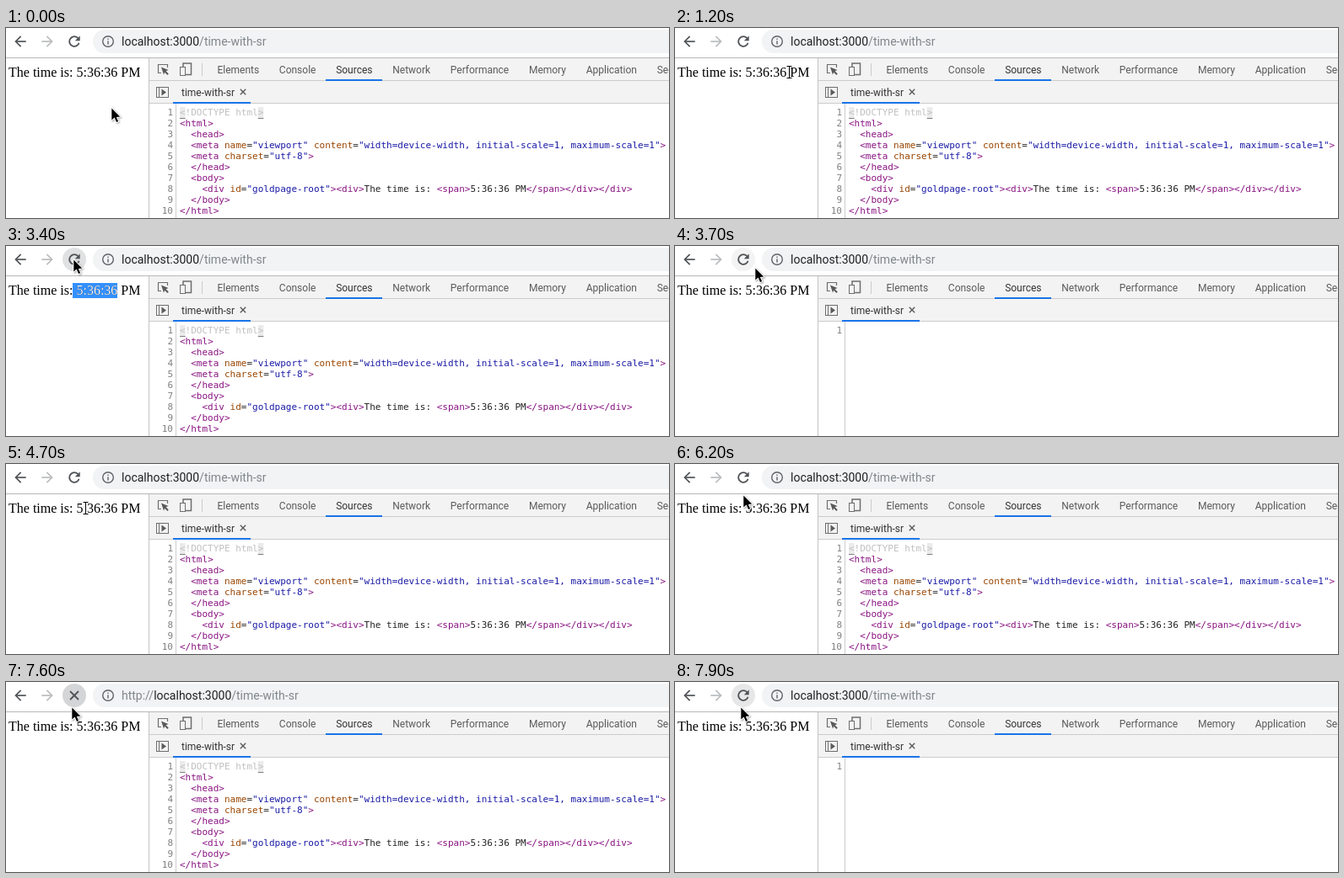
Write an HTML page with a canvas that moves like this. It is 786 px wide and 226 px high and loops after 8 s.

```html
<!DOCTYPE html>
<html>
<head>
<meta charset="utf-8">
<title>Reload demo</title>
<style>
html, body { margin: 0; width: 100%; height: 100%; overflow: hidden; background: #fff; }
canvas, svg { position: absolute; left: 0; top: 0; width: 786px; height: 226px; }
text { white-space: pre; }
.page { font: 16px "Liberation Serif", serif; }
.url { font: 14px Roboto, sans-serif; fill: #202124; }
.tab { font: 12px Roboto, sans-serif; fill: #5a5a5a; }
.on { fill: #333; }
.code { font: 11px "DejaVu Sans Mono", monospace; fill: #222; }
</style>
</head>
<body>
<canvas id="back" width="786" height="226"></canvas>
<svg id="words" viewBox="0 0 786 226">
  <clipPath id="clip"><rect id="sel" y="44" height="18" width="0"/></clipPath>
</svg>
<canvas id="front" width="786" height="226"></canvas>
<script>
const $ = id => document.getElementById(id);
const bg = $('back').getContext('2d');
const fg = $('front').getContext('2d');
const svg = $('words');
const LOOP = 8000;
const INK = '#505357';
const TOOL = '#6e6e6e';
const PAGE_TEXT = 'The time is: 5:36:36 PM';

function el(tag, parent, attrs, text) {
  const e = document.createElementNS('http://www.w3.org/2000/svg', tag);
  for (const k in attrs) e.setAttribute(k, attrs[k]);
  if (text) e.textContent = text;
  parent.appendChild(e);
  return e;
}
function label(cls, x, y, text, parent = svg, fill = '') {
  const e = el('text', parent, { class: cls, x, y }, text);
  e.style.fill = fill;
  return e;
}

// ---- text ----
const url = label('url', 137, 21);
const scheme = el('tspan', url, { fill: '#80868b' });
el('tspan', url, {}, 'localhost:3000');
el('tspan', url, { fill: '#80868b' }, '/time-with-sr');

label('page', 3, 58, PAGE_TEXT);
const picked = label('page', 3, 58, PAGE_TEXT, svg, '#fff');
picked.setAttribute('clip-path', 'url(#clip)');

let tabX = 250.4;
for (const name of 'Elements Console Sources Network Performance Memory Application Security'.split(' ')) {
  const tab = label(name === 'Sources' ? 'tab on' : 'tab', tabX, 54, name);
  tabX += tab.getComputedTextLength() + 23.7;
}
label('tab on', 208, 81, 'time-with-sr');

const lines = [
  '<!DOCTYPE html>',
  '<html>',
  '  <head>',
  '  <meta name="viewport" content="width=device-width, initial-scale=1, maximum-scale=1">',
  '  <meta charset="utf-8">',
  '  </head>',
  '  <body>',
  '    <div id="goldpage-root"><div>The time is: <span>5:36:36 PM</span></div></div>',
  '  </body>',
  '</html>'
];
const CH = 6.622;
const code = el('g', svg, {});
const token = /(<\/?\w+|>)|(\s\w+(?==))|("[^"]*")|=|[^<>]+/g;
lines.forEach((line, i) => {
  const y = 104 + 13 * i;
  const num = label('code', 198, y, String(i + 1), i ? code : svg, '#808080');
  num.setAttribute('text-anchor', 'end');
  const body = line.trimStart();
  const row = label('code', 206 + CH * (line.length - body.length), y, '', code);
  if (!i) {
    row.textContent = body;
    row.style.fill = '#c0c0c0';
    return;
  }
  for (const [text, tag, attr, value] of body.matchAll(token))
    el('tspan', row, { fill: tag ? '#881280' : attr ? '#994500' : value ? '#1a1aa6' : '#222' }, text);
});

// ---- shapes ----
function box(x, y, w, h, color) {
  bg.fillStyle = color;
  bg.fillRect(x, y, w, h);
}
function trace(c, pts, close) {
  c.beginPath();
  for (let i = 0; i < pts.length; i += 2) c.lineTo(pts[i], pts[i + 1]);
  if (close) c.closePath();
}
function line(color, width, ...pts) {
  bg.strokeStyle = color;
  bg.lineWidth = width;
  trace(bg, pts);
  bg.stroke();
}
function fill(color, ...pts) {
  bg.fillStyle = color;
  trace(bg, pts, true);
  bg.fill();
}
function frame(x, y, w, h) {
  bg.strokeStyle = TOOL;
  bg.lineWidth = 1;
  bg.strokeRect(x + .5, y + .5, w, h);
}
function arc(x, y, r, from, to, color, width) {
  bg.strokeStyle = color;
  bg.lineWidth = width;
  bg.beginPath();
  bg.arc(x, y, r, from, to);
  bg.stroke();
}
function cross(x, y, r, color, width) {
  line(color, width, x - r, y - r, x + r, y + r);
  line(color, width, x + r, y - r, x - r, y + r);
}
function navArrow(x, dir, color) {
  line(color, 1.7, x + 6.7 * dir, 16, x - 5.6 * dir, 16);
  line(color, 1.7, x + .6 * dir, 9.9, x - 5.5 * dir, 16, x + .6 * dir, 22.1);
}
function reloadIcon() {
  arc(81, 16, 5.8, .29, -.72, INK, 1.8);
  fill(INK, 87.7, 9.3, 87.7, 15.2, 81.8, 15.2);
}

function toolbar(loading, glow) {
  navArrow(17, 1, INK);
  navArrow(49, -1, '#babcbe');
  bg.fillStyle = `rgba(60,64,67,${glow})`;
  bg.beginPath();
  bg.arc(81, 16, 14, 0, 7);
  bg.fill();
  loading ? cross(81, 16, 5, INK, 1.8) : reloadIcon();

  bg.fillStyle = '#f1f3f4';
  bg.beginPath();
  bg.roundRect(103, 2, 720, 28, 14);
  bg.fill();
  arc(121, 16, 6.3, 0, 7, '#5f6368', 1.4);
  box(120.3, 15.3, 1.4, 4.2, '#5f6368');
  box(120.3, 12.5, 1.4, 1.4, '#5f6368');
  box(0, 35, 786, 1, '#b8b7b8');
}

function devtools(empty) {
  box(170, 36, 616, 54, '#f3f3f3');
  box(169, 36, 1, 190, '#c4c4c4');
  box(170, 62, 616, 1, '#ccc');
  box(170, 89, 616, 1, '#ccc');
  box(379, 61, 67, 2, '#1a73e8');
  box(198, 88, 92, 2, '#1a73e8');
  box(201, 90, 1, 136, '#ccc');
  box(232, 42, 1, 15, '#ccc');

  // inspect
  line(TOOL, 1.2, 184, 53.5, 180.5, 53.5, 180.5, 43.5, 191.5, 43.5, 191.5, 47);
  fill('#5a5a5a', 184, 46.5, 192.5, 50, 189.6, 51.3, 192.8, 54.6, 191.4, 56, 188.2, 52.8, 187, 55.4);
  // device
  line(TOOL, 1.5, 210, 46, 210, 42, 219.5, 42, 219.5, 55.5, 213, 55.5);
  frame(206, 46, 6, 10);
  // navigator
  frame(178, 70, 14, 12);
  line(TOOL, 1, 181.5, 70, 181.5, 82);
  fill('#5a5a5a', 184.5, 72.5, 190, 76.5, 184.5, 80.5);
  cross(281, 76, 3.2, '#5a5a5a', 1.4);

  if (empty) return;
  for (const x of [206, 206 + CH * 14]) {
    box(x, 94, CH, 13, 'rgba(0,0,0,.08)');
    box(x, 107, CH, 1, 'rgba(0,0,0,.5)');
  }
}

// ---- pointer ----
const spots = {
  rest: [125, 94], textEnd: [139, 52], textStart: [81, 52], digit: [94, 52],
  below: [81, 36], button: [80, 15], edge: [78, 29], textTop: [81, 42]
};
const moves = [
  [0, 900, 'textEnd'], [1100, 1700, 'textStart'], [2100, 2400, 'below'],
  [3100, 3200, 'button'], [3500, 4100, 'textEnd'], [4200, 4700, 'digit'],
  [4700, 5500, 'button'], [5900, 6200, 'below'], [6300, 6400, 'textTop'],
  [6400, 6600, 'button'], [6700, 6900, 'textTop'], [6900, 7100, 'edge'],
  [7100, 7300, 'button'], [7300, 7400, 'edge']
];
function pointer(t) {
  let [x, y] = spots.rest;
  for (const [start, end, name] of moves) {
    if (t <= start) break;
    const k = Math.min(1, (t - start) / (end - start));
    const ease = k * k * (3 - 2 * k);
    x += (spots[name][0] - x) * ease;
    y += (spots[name][1] - y) * ease;
  }
  return [Math.round(x), Math.round(y)];
}

function arrow(x, y) {
  fg.save();
  fg.translate(x - .2, y + 1);
  trace(fg, [.5, .5, .5, 14.6, 3.8, 11.6, 6.2, 17, 8.3, 16.1, 6, 10.9, 10.4, 10.6], true);
  fg.lineJoin = 'round';
  fg.strokeStyle = '#fff';
  fg.lineWidth = 2;
  fg.shadowColor = 'rgba(0,0,0,.35)';
  fg.shadowBlur = 2;
  fg.shadowOffsetX = fg.shadowOffsetY = 1;
  fg.stroke();
  fg.shadowColor = 'transparent';
  fg.fillStyle = '#000';
  fg.fill();
  fg.restore();
}
function beam(x, y) {
  for (const [color, width] of [['#fff', 3], ['#000', 1]]) {
    fg.strokeStyle = color;
    fg.lineWidth = width;
    for (const p of [[0, -7, 0, 7], [-3, -7, 3, -7], [-3, 7, 3, 7]]) {
      trace(fg, p.map((v, i) => v + (i % 2 ? y : x) + .5));
      fg.stroke();
    }
  }
}

// ---- state ----
const within = (t, a, b) => t >= a && t < b;
const CLICKS = [3200, 7600];

function onButton(t) {
  const [x, y] = pointer(t);
  return Math.hypot(x - 81, y - 16) < 15;
}
// hover tint plus a ripple that fades after each click
function buttonGlow(t) {
  let glow = onButton(t) || onButton(t - 100) ? .05 : 0;
  for (const c of CLICKS)
    if (t >= c) glow = Math.max(glow, .22 * (1 - (t - c) / 700));
  return glow;
}

// text position nearest to x, from the end of "is:" to the end of the time
function caret(x) {
  bg.font = '16px "Liberation Serif", serif';
  let best = Infinity;
  for (let i = 12; i <= 20; i++) {
    const edge = 3 + bg.measureText(PAGE_TEXT.slice(0, i)).width;
    if (Math.abs(edge - x) < Math.abs(best - x)) best = edge;
  }
  return Math.floor(best);
}

function select(left, right) {
  const width = right - left;
  $('sel').setAttribute('x', left);
  $('sel').setAttribute('width', width);
  picked.style.display = width ? '' : 'none';
  box(left, 44, width, 18, '#3390ff');
}

function draw(t) {
  const [x, y] = pointer(t);
  const loading = within(t, 3200, 3400) || within(t, 7600, 7900);
  const empty = within(t, 3600, 3800) || t >= 7900;
  const end = caret(LOOP);

  bg.clearRect(0, 0, 786, 226);
  fg.clearRect(0, 0, 786, 226);
  toolbar(loading, buttonGlow(t));
  devtools(empty);
  scheme.textContent = loading ? 'http://' : '';
  code.style.display = empty ? 'none' : '';
  select(within(t, 1200, 3600) ? caret(pointer(Math.min(t, 1700))[0]) : end, end);

  const overText = within(y, 45, 63) && x < 160;
  (overText ? beam : arrow)(x, y);
}

const begin = performance.now();
let last = -1;
function tick() {
  const t = Math.floor((performance.now() - begin) % LOOP / 100) * 100;
  if (t !== last) draw(last = t);
  requestAnimationFrame(tick);
}
tick();
</script>
</body>
</html>
```
